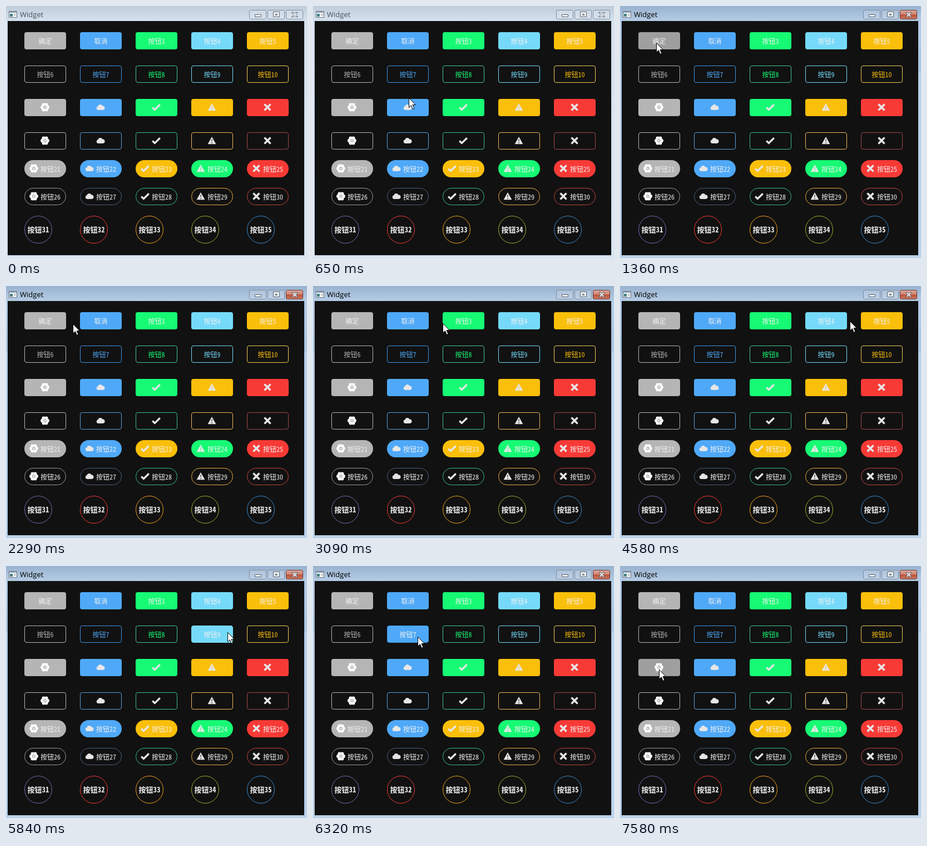
Write an HTML page that moves like this. It is 541 px wide and 453 px high and loops after 8 s.

```html
<!DOCTYPE html>
<html lang="zh">
<head>
<meta charset="utf-8">
<style>
html, body { margin: 0; width: 100%; height: 100%; overflow: hidden; }
svg { display: block; }
text { font: 12px "Noto Sans Mono CJK SC", "Noto Sans CJK SC", "Noto Sans CJK", monospace; text-anchor: middle; }
.bold { font-size: 13px; font-weight: bold; }
.title { font: 13px "Open Sans", "Noto Sans", sans-serif; text-anchor: start; fill: #4b535c; }
.on .title { fill: #000; }
.frame { fill: url(#idle); }
.on .frame { fill: url(#live); }
.cap { fill: #fff; fill-opacity: .16; stroke: #7f8b9b; }
.on .close { fill: url(#red); fill-opacity: 1; stroke: #6b3a3a; }
.sign { fill: #f6f6f6; stroke: #535f70; }
</style>
</head>
<body>
<svg id="stage" width="541" height="453" viewBox="0 0 541 453">
  <defs>
    <linearGradient id="idle" x2="0" y2="1">
      <stop stop-color="#bfcddb"/><stop offset=".06" stop-color="#d5e1ee"/><stop offset="1" stop-color="#d7e4f2"/>
    </linearGradient>
    <linearGradient id="live" x2="0" y2="1">
      <stop stop-color="#98b2cf"/><stop offset=".06" stop-color="#b5cce5"/>
      <stop offset=".25" stop-color="#abc6e3"/><stop offset=".27" stop-color="#b9d1ea"/><stop offset="1" stop-color="#b9d1ea"/>
    </linearGradient>
    <linearGradient id="red" x2="0" y2="1">
      <stop stop-color="#dfa79b"/><stop offset=".48" stop-color="#cf8471"/>
      <stop offset=".52" stop-color="#b9513a"/><stop offset="1" stop-color="#cd7b60"/>
    </linearGradient>
  </defs>
  <rect class="frame" width="541" height="453"/>
  <path d="M5.5 9.5h14v11h-14z" fill="#f4f4f4" stroke="#6b7683"/>
  <path d="M6 10h13v2H6z" fill="#8aa0b8"/>
  <path d="M7 14h5v5H7z" fill="#3f7f86"/>
  <path d="M14 14.5h4M14 16.5h4" stroke="#aaa"/>
  <text class="title" x="25" y="20">Widget</text>
  <rect class="cap" x="437.5" y="7.5" width="30" height="16" rx="2"/>
  <rect class="cap" x="470.5" y="7.5" width="30" height="16" rx="2"/>
  <rect class="cap close" x="503.5" y="7.5" width="30" height="16" rx="2"/>
  <path class="sign" d="M447.5 15.5h11v4h-11z"/>
  <path class="sign" fill-rule="evenodd" d="M480.5 10.5h11v9h-11zM484.5 14.5h3v2h-3z"/>
  <path class="sign" d="M513.5 11.5h3.5l2 2.2 2-2.2h3.5l-3.6 4 3.6 4h-3.5l-2-2.2-2 2.2h-3.5l3.6-4z"/>
  <rect x="3" y="27" width="533" height="421" fill="#111"/>
  <g id="buttons"></g>
  <path id="cursor" d="M.5.5V17.3L4.4 13.6 7.3 20.4 10 19.2 7.1 12.6H12.3Z" fill="#fff" stroke="#000"/>
</svg>
<script>
const $ = id => document.getElementById(id);
const add = (tag, attrs, parent) => {
  const el = document.createElementNS('http://www.w3.org/2000/svg', tag);
  for (const k in attrs) el.setAttribute(k, attrs[k]);
  return parent.appendChild(el);
};

const GRAY = '#b5b5b5', BLUE = '#4fa9f8', GREEN = '#16fa74', SKY = '#75dafa', GOLD = '#fabf0a', RED = '#f83a36';
const LIGHT = '#f0f0f0';
// y, corner radius, filled, content, colours
const rows = [
  [47, 4, 1, 'text', [GRAY, BLUE, GREEN, SKY, GOLD]],
  [107, 4, 0, 'text', [GRAY, BLUE, GREEN, SKY, GOLD], [GRAY, '#3f95e4', '#45c795', SKY, '#f3c853']],
  [167, 4, 1, 'icon', [GRAY, BLUE, GREEN, GOLD, RED]],
  [227, 4, 0, 'icon', [GRAY, BLUE, GREEN, GOLD, RED], [GRAY, '#5a9fdc', '#3dbb8a', '#edb95c', '#a34747']],
  [277, 15.5, 1, 'both', [GRAY, BLUE, GOLD, GREEN, RED]],
  [327, 15.5, 0, 'both', [GRAY, BLUE, GREEN, GOLD, RED], ['#999', '#4b6078', '#35bd8b', '#e2ad45', '#c2443f']],
  [377, 25, 0, 'bold', ['#6f6fb5', RED, '#f0a020', '#a0b030', '#3a8ad0']]
];

function icon(kind, x, y, parent) {
  const g = add('g', { transform: `translate(${x} ${y})`, fill: '#e6e6e6' }, parent);
  const path = (d, more) => add('path', { d, ...more }, g);
  if (kind == 0) {
    for (let a = 0; a < 6; a++)
      add('circle', { cx: 4.7 * Math.cos(a * Math.PI / 3), cy: 4.9 * Math.sin(a * Math.PI / 3), r: 3.2, fill: '#fff' }, g);
    add('circle', { r: 2.3, fill: '#fff', stroke: '#777' }, g);
  } else if (kind == 1) path('M-4 5A3.4 3.4 0 0 1-4.6-1.7 4.4 4.4 0 0 1 3.6-2.4 3.7 3.7 0 0 1 4 5Z');
  else if (kind == 2) path('M-6.8 .5L-2.6 4.5 6.8-4.7', { fill: 'none', stroke: '#e6e6e6', 'stroke-width': 3.4 });
  else if (kind == 3) path('M0-6.5L7 6H-7ZM-1-2.5L-.6 2H.6L1-2.5ZM-1 3V5H1V3Z', { 'fill-rule': 'evenodd', stroke: '#e6e6e6', 'stroke-width': .5, 'stroke-linejoin': 'round' });
  else path('M-5.5-5.5L5.5 5.5M5.5-5.5L-5.5 5.5', { stroke: '#e6e6e6', 'stroke-width': 3.6 });
}

const buttons = [];
rows.forEach(([y, r, filled, kind, colors, edges = colors], row) => colors.forEach((color, col) => {
  const x = 33 + col * 100, n = row * 5 + col + 1;
  const w = kind == 'bold' ? 50 : 75, h = kind == 'bold' ? 50 : 31;
  const inset = filled ? 0 : .5;
  const box = add('rect', {
    x: x + inset, y: y + inset, width: w - 2 * inset, height: h - 2 * inset, rx: r - inset,
    stroke: filled ? 'none' : edges[col]
  }, $('buttons'));
  let label;
  if (kind != 'icon') {
    label = add('text', {
      x: x + (kind == 'both' ? 47 : w / 2), y: y + (kind == 'bold' ? 30 : 20.5), class: kind
    }, $('buttons'));
    label.textContent = n == 1 ? '确定' : n == 2 ? '取消' : '按钮' + n;
  }
  if (kind == 'icon') icon(col, x + 37, y + 15, $('buttons'));
  if (kind == 'both') icon(col, x + 17, y + 15, $('buttons'));
  buttons.push({ x, y, w, h, box, label, filled, color, tinted: row == 1 });
}));

// Pointer keys: time, x, y; it moves in ticks of 80 ms
const keys = [
  [90, 422, 396], [890, 65, 66], [1660, 65, 66], [1740, 64, 70],
  [1890, 64, 70], [2610, 165, 67], [2690, 165, 67], [3090, 233, 67], [3250, 265, 64],
  [3710, 265, 64], [4190, 363, 63], [4340, 363, 63], [4580, 413, 63], [4820, 467, 65],
  [5280, 467, 65], [5600, 455, 117], [5840, 398, 119], [6160, 262, 122],
  [6320, 188, 127], [6720, 70, 125], [7260, 70, 125], [7580, 70, 186], [8000, 70, 186]
];

function pointer(t) {
  const i = keys.findLastIndex(k => t >= k[0]);
  const [t0, x0, y0] = keys[i], [t1, x1, y1] = keys[i + 1];
  const p = Math.floor((t - t0) / 80) * 80 / (t1 - t0);
  return [Math.round(x0 + (x1 - x0) * p), Math.round(y0 + (y1 - y0) * p)];
}

function draw(t) {
  const shown = t >= 90;
  const [px, py] = shown ? pointer(t) : [-50, -50];
  $('stage').classList.toggle('on', t >= 1360);
  $('cursor').setAttribute('transform', `translate(${px} ${py})`);
  for (const b of buttons) {
    const hover = px > b.x && px < b.x + b.w && py > b.y && py < b.y + b.h;
    b.box.style.fill = b.filled
      ? (hover ? `color-mix(in srgb, ${b.color}, #000 12%)` : b.color)
      : (hover ? b.color : 'none');
    if (b.label) b.label.style.fill = b.tinted && !hover ? b.color : LIGHT;
  }
}

const start = performance.now();
function tick() {
  draw((performance.now() - start) % 8000);
  requestAnimationFrame(tick);
}
tick();
</script>
</body>
</html>
```
